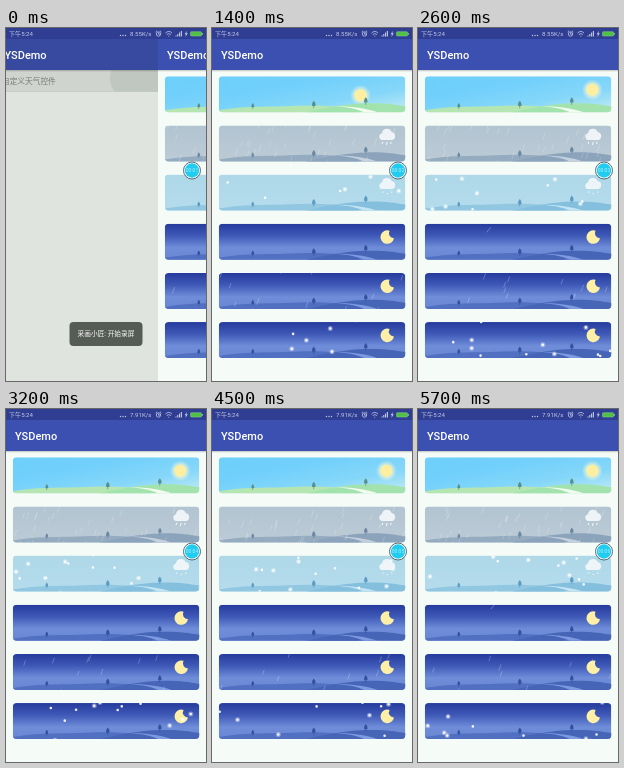
Animation, 200 px wide and 353 px high, one loop 5.8 s. Source, as an HTML page:

```html
<!DOCTYPE html>
<html lang="zh">
<head>
<meta charset="utf-8">
<style>
html, body { margin: 0; width: 100%; height: 100%; overflow: hidden; background: #f5fbf6; }
svg { overflow: hidden; }
#stage { display: block; width: 100%; height: 100%; }
text { font-family: Roboto, "Noto Sans CJK SC", "Noto Sans CJK", sans-serif; fill: #fff; }
.title { font-size: 11px; font-weight: 500; }
.small { font-size: 6.1px; fill: #c3cae8; }
.icon { fill: none; stroke: #c3cae8; stroke-width: .8; }
.far { fill: var(--far); }
.near { fill: var(--near); }
.path { fill: var(--path); }
.tree { fill: var(--tree); }
.rain { fill: none; stroke: #fff; stroke-width: .6; }
.snow { stroke: #fff; stroke-linecap: round; fill: none; }
</style>
</head>
<body>
<svg id="stage" viewBox="0 0 200 353" preserveAspectRatio="none">
  <defs>
    <clipPath id="round"><rect width="186.5" height="36" rx="4"/></clipPath>
    <radialGradient id="glow">
      <stop offset=".6" stop-color="#fff8cc" stop-opacity=".6"/>
      <stop offset="1" stop-color="#fff8d8" stop-opacity="0"/>
    </radialGradient>
    <linearGradient id="shade" x2="0" y2="1">
      <stop offset="0" stop-color="#000" stop-opacity=".22"/>
      <stop offset="1" stop-color="#000" stop-opacity="0"/>
    </linearGradient>
    <g id="tree">
      <path d="M0-6.5C1.4-5 2-3.500 1.600-1.200H-1.600C-2-3.500-1.400-5 0-6.500Z"/>
      <rect x="-.35" y="-1.500" width=".7" height="2.500"/>
    </g>
    <g id="land">
      <path class="far" d="M0 34C22 30 45 30.500 65 30S105 27.500 140 33V37H0Z"/>
      <path class="near" d="M84 37C108 31 128 27.500 147 27S174 28 187 30V37Z"/>
      <path class="path" d="M113 29.800C126 30.500 138 32 147 37H161C150 32.300 133 30 113 29.800Z"/>
      <g class="tree">
        <use href="#tree" transform="translate(34 32) scale(.8)"/>
        <use href="#tree" x="95" y="31"/>
        <use href="#tree" x="147" y="27.500"/>
      </g>
    </g>
    <path id="cloud" fill="#f4f8fb" fill-opacity=".92" d="M163.500 14.500a3.400 3.400 0 0 1-.3-6.700a5 5 0 0 1 9.600-1.300a4.100 4.100 0 0 1 .6 8Z"/>
    <path id="moon" fill="#fdf0a6" d="M170.800 6.900A6.800 6.800 0 1 0 175.200 14.500A5 5 0 0 1 170.800 6.900Z"/>
  </defs>

  <g id="old">
    <rect y="11" width="200" height="342" fill="#dfe4df"/>
    <rect y="42" width="200" height="21.500" fill="#cfd4cf"/>
    <path d="M116 42Q112 54 119 63.500H200V42Z" fill="#c0c6c0"/>
    <rect y="63" width="200" height=".6" fill="#bfc5bf"/>
    <rect y="11" width="200" height="31" fill="#374a9f"/>
    <rect y="42" width="200" height="2" fill="url(#shade)"/>
    <text class="title" x="9" y="31">YSDemo</text>
    <text x="6.500" y="55.800" style="font-size:7.700px;fill:#777c78">自定义天气控件</text>
  </g>

  <g id="page">
    <rect y="11" width="200" height="342" fill="#f5fbf6"/>
    <rect y="11" width="200" height="31" fill="#3c50b2"/>
    <rect y="42" width="200" height="2" fill="url(#shade)"/>
    <text class="title" x="9" y="31">YSDemo</text>
    <g id="cards"></g>
  </g>

  <rect width="200" height="11" fill="#2f3e92"/>
  <text class="small" x="3" y="8">下午5:24</text>
  <g fill="#c3cae8"><circle cx="114.500" cy="7.500" r=".7"/><circle cx="117" cy="7.500" r=".7"/><circle cx="119.500" cy="7.500" r=".7"/></g>
  <text class="small" id="speed" x="124" y="8"></text>
  <g class="icon">
    <circle cx="152.500" cy="6" r="2.200"/>
    <path d="M152.500 4.500V6.200H154M149.700 4l1.400-1.300M155.300 4l-1.400-1.300"/>
    <path d="M159.500 5Q162.800 1.800 166 5M160.700 6.600Q162.800 4.600 164.900 6.600M162.300 8.200H163.300"/>
    <path d="M170 8.500V7.500M171.800 8.500V6M173.600 8.500V4.500M175.400 8.500V3" stroke-width="1.100"/>
  </g>
  <path d="M181 2.800L178.600 6.200H180L179.400 8.900L181.800 5.300H180.300Z" fill="#c3cae8"/>
  <rect x="184.500" y="3.700" width="11" height="4.300" rx=".8" fill="#4fbf45" stroke="#8fd08f" stroke-width=".5"/>
  <rect x="195.800" y="5" width="1" height="1.800" fill="#8fd08f"/>

  <circle cx="186" cy="142.500" r="8.500" fill="#fff" stroke="#4a5866" stroke-width=".9"/>
  <circle cx="186" cy="142.500" r="7.200" fill="#20cdf0"/>
  <text id="timer" x="186" y="144.400" text-anchor="middle" style="font-size:5px" fill-opacity=".65"></text>

  <g id="toast">
    <rect x="63.500" y="294" width="73" height="24" rx="4" fill="#555b55"/>
    <text x="100" y="308.400" text-anchor="middle" style="font-size:6.700px">采画小匠: 开始录屏</text>
  </g>
</svg>
<script>
const LOOP = 5800, STEP = 100, W = 186.5, H = 36;
const $ = id => document.getElementById(id);
const clamp = v => Math.max(0, Math.min(1, v));
const rand = n => { const s = Math.sin(n * 127.1 + 31.7) * 43758.5453; return s - Math.floor(s); };

const night = {
  sky: ['#263b9d', '#3f59b7', '#6f8dd9', '#6886d2'],
  land: { far: '#5270c2', near: '#4765b7', path: '#7d9ae0', tree: '#34509f' },
  moon: true
};
const themes = [
  { sky: ['#6dcffb', '#72d0fb', '#85d7f9', '#c4ebf4'], land: { far: '#b5e6b2', near: '#a2e3ad', path: '#f2fbef', tree: '#578f8b' }, sun: true },
  { sky: ['#b2c4d1', '#bccbd6'], land: { far: '#94abc0', near: '#8ba3bb', path: '#c4d1dd', tree: '#6b87a3' }, cloud: true, drops: 44, tint: .33 },
  { sky: ['#aed7e7', '#b4dcec'], land: { far: '#92c7e2', near: '#85bfde', path: '#c3e4f2', tree: '#5d9bc3' }, cloud: true, flakes: 14 },
  { ...night, meteor: true },
  { ...night, drops: 13, tint: .4 },
  { ...night, flakes: 14 }
];

const marks = {
  rain: '<path class="rain" d="M164 16.500l-.8 2M168.500 16.500l-1 3M172.500 16.500l-.8 2" style="stroke-width:.9"/>',
  snow: '<path class="snow" d="M164 17.500h0M168.500 19h0M173 17.500h0" stroke-width="1.300"/>'
};

function cardMarkup(c, i) {
  const vars = Object.entries(c.land).map(([k, v]) => `--${k}:${v}`).join(';');
  const stops = c.sky.map((s, k) => `<stop offset="${k / (c.sky.length - 1)}" stop-color="${s}"/>`).join('');
  return `<g transform="translate(6.8 ${48.3 + i * 49.15})" style="${vars}"><g clip-path="url(#round)">
    <linearGradient id="sky${i}" x2="${c.sun ? 1 : 0}" y2="1">${stops}</linearGradient>
    <rect width="${W}" height="${H}" fill="url(#sky${i})"/>
    ${c.sun ? '<g id="sun"><circle r="10.500" fill="url(#glow)"/><circle r="6" fill="#fdeea0"/></g>' : ''}
    ${c.moon ? '<use href="#moon"/>' : ''}
    <use href="#land"/>
    ${c.drops ? `<path class="rain" id="rain${i}" stroke-opacity="${c.tint}"/>` : ''}
    ${c.meteor ? '<path class="rain" id="meteor"/>' : ''}
    ${c.flakes ? `<path class="snow" id="halo${i}" stroke-width="5" stroke-opacity=".35"/><path class="snow" id="snow${i}" stroke-width="2.600" stroke-opacity=".9"/>` : ''}
    ${c.cloud ? '<use href="#cloud"/>' + marks[c.drops ? 'rain' : 'snow'] : ''}
  </g></g>`;
}
$('cards').innerHTML = themes.map(cardMarkup).join('');

// Each particle falls through the card, then returns at a new x.
function fallPath(seed, count, t, { speed, drift, span, mark }) {
  let d = '';
  for (let i = 0; i < count; i++) {
    const id = seed * 100 + i;
    const fall = t * speed * (.85 + .3 * rand(id)) - rand(id + 500) * span;
    const cycle = Math.floor(fall / span), y = fall - cycle * span - 7;
    const x = rand(id * 3 + cycle * 17) * (W + 12) - y * drift;
    d += mark(x.toFixed(2), y.toFixed(2), id, cycle);
  }
  return d;
}

const rain = {
  speed: .065, drift: .35, span: 48,
  mark(x, y, id) {
    const len = 4.5 + rand(id + 900) * 2.5;
    return `M${x} ${y}l${-len * .35} ${len}`;
  }
};
const snow = { speed: .032, drift: .25, span: 47, mark: (x, y, id, cycle) => cycle < 0 ? '' : `M${x} ${y}h0` };
const largeSnow = { ...snow, mark: (x, y, id, cycle) => id % 2 ? '' : snow.mark(x, y, id, cycle) };

function draw(t) {
  const left = 152 * (1 - clamp((t - 100) / 400)) ** 3;
  $('page').setAttribute('transform', `translate(${left})`);
  $('old').setAttribute('transform', `translate(${(left - 200) * .22})`);
  $('toast').setAttribute('opacity', clamp((750 - t) / 300));
  $('timer').textContent = '00:0' + (Math.floor(t / 1000) + 1);
  $('speed').textContent = t < 3200 ? '8.55K/s' : '7.91K/s';

  const rise = (1 - Math.cos(Math.PI * clamp((t - 200) / 2000))) / 2;
  $('sun').setAttribute('transform', `translate(${93 + 74.5 * rise} ${26.5 - 13 * rise ** 1.3})`);

  const m = (t + 650) % 3150;
  $('meteor').setAttribute('d', `M${70 - m * .08} ${.5 + m * .08}l4-5`);
  $('meteor').setAttribute('opacity', t > 2000 ? .5 * clamp((400 - m) / 250) : 0);

  themes.forEach((c, i) => {
    if (c.drops) $('rain' + i).setAttribute('d', fallPath(i, c.drops, t, rain));
    if (c.flakes) {
      const age = t - 300;
      $('halo' + i).setAttribute('d', fallPath(i, c.flakes, age, largeSnow));
      $('snow' + i).setAttribute('d', fallPath(i, c.flakes, age, snow));
    }
  });
}

const start = performance.now();
function tick() {
  const t = (performance.now() - start) % LOOP;
  draw(t < 200 ? 0 : Math.floor(t / STEP) * STEP);
  requestAnimationFrame(tick);
}
tick();
</script>
</body>
</html>
```
